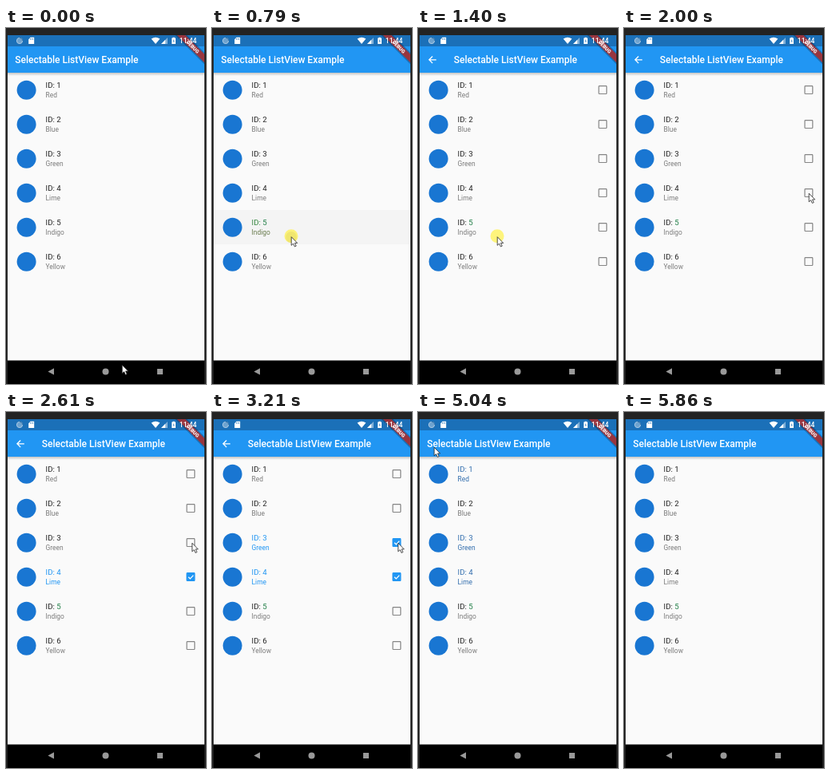
Recreate the animation shown at these times as an HTML page. Size 250x446 px, loop 6460 ms.

```html
<!DOCTYPE html>
<html lang="en">
<head>
<meta charset="utf-8">
<title>Selectable list</title>
<style>
  html, body { margin: 0; width: 100%; height: 100%; overflow: hidden; background: #232323; }
  svg { display: block; width: 250px; height: 446px; font-family: Roboto, sans-serif; }
  .title { font-size: 12px; font-weight: 500; fill: #fff; }
  .name { font-size: 9.6px; }
  .sub { font-size: 8.4px; }
</style>
</head>
<body>
<svg id="stage" viewBox="0 0 250 446">
  <defs>
    <linearGradient id="shade" x2="0" y2="1">
      <stop offset="0" stop-color="#000" stop-opacity=".22"/>
      <stop offset="1" stop-color="#000" stop-opacity="0"/>
    </linearGradient>
    <clipPath id="screen"><rect x="2" y="9" width="246" height="407"/></clipPath>
    <clipPath id="pressed"><rect x="2" y="228" width="246" height="43"/></clipPath>
  </defs>
  <rect width="250" height="446" fill="#232323"/>
  <rect x="2" y="9" width="246" height="408" fill="#fafafa"/>

  <g id="ink" clip-path="url(#pressed)">
    <rect id="wash" x="2" y="228" width="246" height="43" fill="#e0e0e0"/>
    <circle id="ripple" cx="99" cy="262" fill="#d0d0d0"/>
  </g>
  <g id="rows"></g>

  <rect x="2" y="56" width="246" height="4" fill="url(#shade)"/>
  <rect x="2" y="23" width="246" height="33" fill="#2196f3"/>
  <rect x="2" y="9" width="246" height="14" fill="#1b70b8"/>
  <path id="back" d="M22.8 39.8H14M18.2 35.5L13.9 39.8l4.3 4.3" fill="none" stroke="#fff" stroke-width="1.3"/>
  <text id="title" class="title" y="44">Selectable ListView Example</text>

  <g clip-path="url(#screen)">
    <g transform="translate(248 9) rotate(45)">
      <rect x="-27" y="15.4" width="54" height="10.4" fill="#000" opacity=".25"/>
      <rect x="-25" y="16.8" width="50" height="7.4" fill="#98353f"/>
      <text y="22.8" font-size="6.2" font-weight="900" text-anchor="middle" fill="#fff">DEBUG</text>
    </g>
  </g>

  <circle cx="17" cy="16" r="3.6" fill="#6fa3cf" stroke="#a9c9e4"/>
  <path d="M17 12.4a3.6 3.6 0 0 1 3.6 3.6" fill="none" stroke="#3d79ad" stroke-width="1.2"/>
  <path d="M28.2 14.2l2.4-2.4h4.6v8.2h-7z" fill="#fff"/>
  <path d="M30.4 13v1.6M32 13v1.6M33.6 13v1.6" stroke="#1b70b8" stroke-width=".7"/>
  <path d="M181.6 13.6q5.4-3.6 10.8 0L187 20z" fill="#fff"/>
  <path d="M194 20l8-8v8z" fill="#fff" opacity=".45"/>
  <path d="M194 20l5.2-5.2V20z" fill="#fff"/>
  <path d="M207.2 12.6h1.3v-.9h2.2v.9h1.3V20h-4.8z" fill="#fff"/>
  <path d="M210 14l-1.4 2.6h1l-.4 2 1.5-2.7h-1z" fill="#1b70b8"/>
  <text x="216.8" y="19" font-size="8.5" font-weight="500" fill="#fff">11:44</text>

  <rect x="2" y="416.5" width="246" height="29.5" fill="#000"/>
  <path d="M60 426.2v8.4l-7.6-4.2z" fill="#999"/>
  <circle cx="124.5" cy="430.5" r="4" fill="#999"/>
  <rect x="189" y="427" width="7" height="7" fill="#999"/>

  <g id="pointer">
    <circle id="click" cy="-.7" r="8.5" fill="#fff040" opacity=".68"/>
    <path d="M.2.2v10.6l2.4-2.2 1.7 3.8 1.9-.8-1.7-3.7h3.2z" fill="#fff" stroke="#222" stroke-width=".8"/>
  </g>
</svg>
<script>
const LOOP = 6460, TICKS = 32, LEAD = 22;

// All times below are in ticks.
const PRESS = 4, SELECT = 7, LEAVE = 25, CLEAR = 26, HIDE = 29;

// Places where the pointer rests; it clicks while resting.
const STOPS = [
  { from: 0, to: 0, x: 145, y: 422 },
  { from: 3, to: 9, x: 99, y: 261.5 },
  { from: 10, to: 12, x: 231, y: 207 },
  { from: 13, to: 16, x: 232.5, y: 164 },
  { from: 18, to: 20, x: 222.7, y: 83 },
  { from: 23, to: 25, x: 20, y: 44 },
  { from: 26, to: 26, x: 20, y: 44 },
  { from: 28, to: TICKS, x: 197, y: 400 }
];

const LABELS = ["Red", "Blue", "Green", "Lime", "Indigo", "Yellow"];
const CHECKED = { Lime: 12, Green: 15, Red: 20 };
const DARK = "#222", GREY = "#7c7c7c", BLUE = "#2196f3", GREEN = "#1f7d45";

const $ = id => document.getElementById(id);
const show = (el, on) => el.setAttribute("visibility", on ? "visible" : "hidden");
const within = (n, a, b) => n >= a && n < b;
const smooth = k => k * k * (3 - 2 * k);

function add(parent, tag, attrs, text = "") {
  const el = document.createElementNS("http://www.w3.org/2000/svg", tag);
  for (const k in attrs) el.setAttribute(k, attrs[k]);
  el.textContent = text;
  return parent.appendChild(el);
}

const rows = LABELS.map((label, i) => {
  const g = add($("rows"), "g", { transform: `translate(0 ${78 + 43 * i})` });
  add(g, "circle", { cx: 25.6, cy: -.3, r: 12, fill: "#1976d2" });
  const name = add(g, "text", { class: "name", x: 49.6, y: -3 }, "ID: ");
  const digit = add(name, "tspan", {}, i + 1);
  const sub = add(g, "text", { class: "sub", x: 49.6, y: 9 }, label);
  const box = add(g, "rect", { x: 226, y: -5.3, width: 9.8, height: 9.8, rx: .8, "stroke-width": 1.2 });
  const mark = add(g, "path", {
    d: "M228 -.3l2.2 2.2 4-4.3", fill: "none", stroke: "#fff", "stroke-width": 1.3
  });
  return { checkAt: CHECKED[label] ?? Infinity, held: label === "Indigo", name, digit, sub, box, mark };
});

function pointAt(n) {
  const i = STOPS.findIndex(s => n <= s.to);
  const b = STOPS[i];
  if (n >= b.from) return [b.x, b.y];
  const a = STOPS[i - 1];
  const k = smooth((n - a.to) / (b.from - a.to));
  return [a.x + (b.x - a.x) * k, a.y + (b.y - a.y) * k];
}

function drawRow(row, n, selecting) {
  const checked = n >= row.checkAt;
  // The text turns blue one tick after the box.
  const tint = within(n, row.checkAt + 1, CLEAR) && (n < LEAVE ? BLUE : "#346fae");
  const pressed = row.held && within(n, PRESS, SELECT);
  row.name.setAttribute("fill", tint || (pressed ? "#35853f" : DARK));
  row.digit.setAttribute("fill", tint || (row.held && n >= PRESS ? GREEN : DARK));
  row.sub.setAttribute("fill", tint || (pressed ? "#687a4c" : GREY));

  show(row.box, selecting);
  show(row.mark, selecting && checked);
  row.box.setAttribute("fill", checked ? BLUE : "none");
  row.box.setAttribute("stroke", checked ? BLUE : "#858585");
}

function draw(n) {
  const selecting = within(n, SELECT, LEAVE);
  show($("back"), selecting);
  $("title").setAttribute("x", selecting ? 44.8 : 11.2);
  rows.forEach(row => drawRow(row, n, selecting));

  const grown = Math.max(0, (n - PRESS + .3) / 2.3);
  show($("ink"), within(n, PRESS, SELECT));
  $("wash").setAttribute("opacity", Math.min(1, grown * 2));
  $("ripple").setAttribute("r", 53 * grown);

  $("pointer").setAttribute("transform", `translate(${pointAt(n)})`);
  $("pointer").setAttribute("opacity", n < HIDE ? 1 : 0);
  show($("click"), n < HIDE && STOPS.some(s => n > s.from && n < s.to));
}

const start = performance.now();
function frame() {
  const t = (performance.now() - start) % LOOP;
  draw(Math.min(TICKS - 1, Math.floor((t + LEAD) / LOOP * TICKS)));
  requestAnimationFrame(frame);
}
frame();
</script>
</body>
</html>
```
